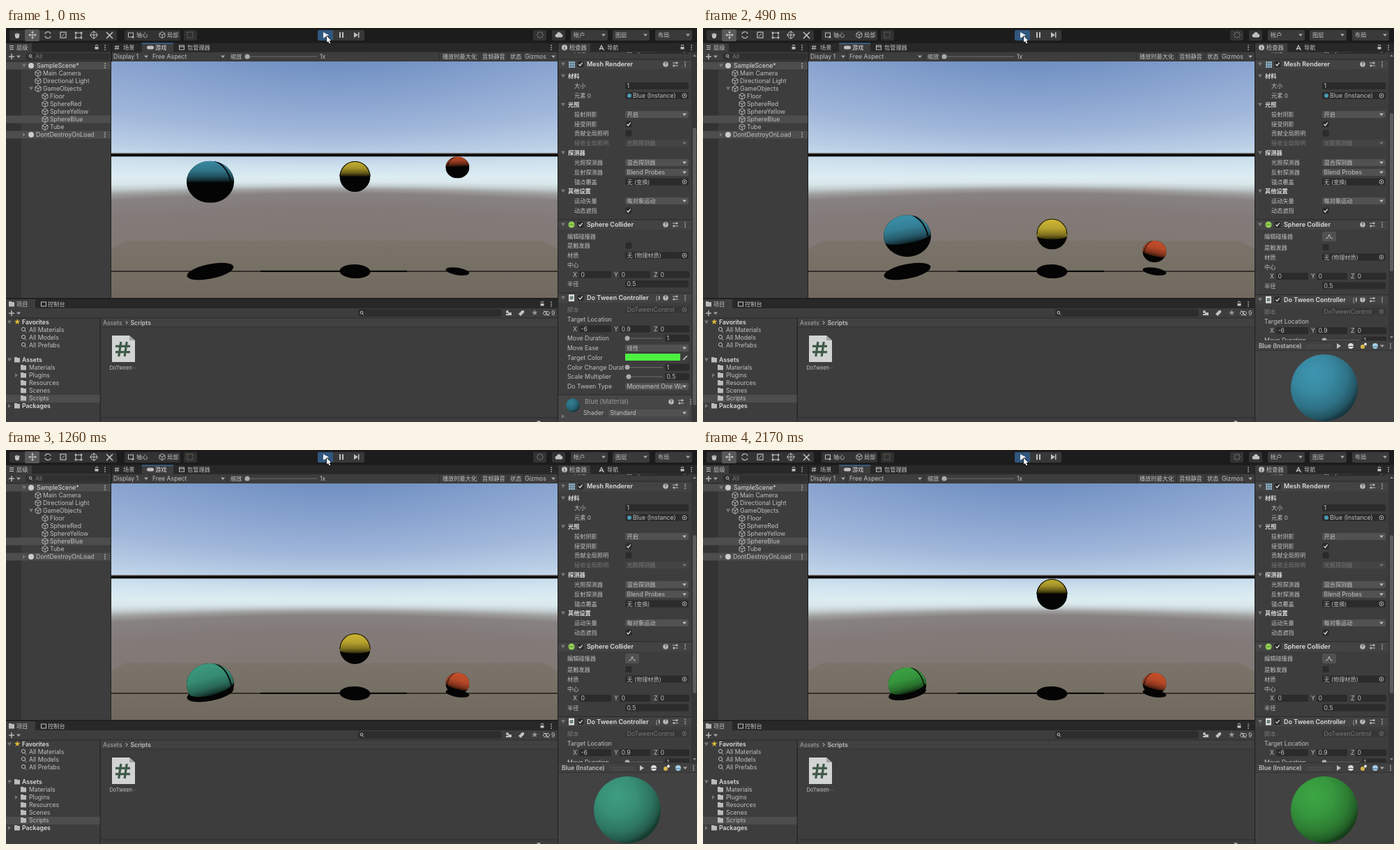
An HTML page with a canvas that plays this animation: 991 by 565 pixels, repeating every 2.24 s.

```html
<!DOCTYPE html>
<html lang="zh">
<head>
<meta charset="utf-8">
<style>
html, body { margin: 0; width: 991px; height: 565px; overflow: hidden; background: #3c3c3c; }
canvas { display: block; }
</style>
</head>
<body>
<canvas id="stage" width="991" height="565"></canvas>
<script>
const g = document.getElementById('stage').getContext('2d');
const LOOP = 2240, STEP = 70, PI = Math.PI;
const INK = '#c0c0c0', DIM = '#777', FIELD = '#2b2b2b', BOX = '#515151', PANEL = '#3d3d3d', DARK = '#282828';

// ---- drawing helpers ----
function rect(x, y, w, h, c) { g.fillStyle = c; g.fillRect(x, y, w, h); }
function text(s, x, y, c = INK, bold = false, size = /[\u4e00-\u9fff]/.test(s) ? 8.2 : 8.7) {
  g.font = `${bold ? 600 : 400} ${size}px Inter, "Noto Sans CJK SC", "Noto Sans CJK", sans-serif`;
  g.fillStyle = c;
  g.fillText(s, x, y + .6);
}
function poly(c, ...p) {
  g.fillStyle = c;
  g.beginPath();
  for (let i = 0; i < p.length; i += 2) g.lineTo(p[i], p[i + 1]);
  g.fill();
}
function line(c, w, ...p) {
  g.strokeStyle = c; g.lineWidth = w;
  g.beginPath();
  for (let i = 0; i < p.length; i += 2) g.lineTo(p[i], p[i + 1]);
  g.stroke();
}
function disc(x, y, r, c) { g.fillStyle = c; g.beginPath(); g.arc(x, y, r, 0, 7); g.fill(); }
function ring(x, y, r, c = INK, w = 1) {
  g.strokeStyle = c; g.lineWidth = w;
  g.beginPath(); g.arc(x, y, r, 0, 7); g.stroke();
}
function box(x, y, w, h, c, r = 2) { g.fillStyle = c; g.beginPath(); g.roundRect(x, y, w, h, r); g.fill(); }
const down = (x, y, c = '#aaa') => poly(c, x - 3, y - 1.5, x + 3, y - 1.5, x, y + 2);
const right = (x, y, c = '#777') => poly(c, x - 2, y - 3, x + 2, y, x - 2, y + 3);
const fold = (x, y) => poly('#777', x - 3, y - 2.5, x + 3, y - 2.5, x, y + 2.5);
const dots = (x, y) => { for (const d of [-3, 0, 3]) rect(x - .7, y + d - .7, 1.5, 1.5, INK); };
const plus = (x, y) => { line(INK, 1.4, x - 4, y, x + 4, y); line(INK, 1.4, x, y - 4, x, y + 4); };
function lock(x, y) {
  rect(x - 2.5, y, 5, 3.5, INK);
  g.strokeStyle = INK; g.lineWidth = 1;
  g.beginPath(); g.arc(x, y - 1, 1.8, PI, 0); g.stroke();
}
function lens(x, y, r = 2.5) { ring(x, y - 1, r); line(INK, 1, x + r * .7, y + r * .5, x + r * 1.6, y + r * 1.4); }
function cube(x, y) {
  const h = 2.3;
  line(INK, .9, x, y - 4.5, x + 4, y - h, x + 4, y + h, x, y + 4.5, x - 4, y + h, x - 4, y - h, x, y - 4.5);
  line(INK, .9, x - 4, y - h, x, y, x + 4, y - h);
  line(INK, .9, x, y, x, y + 4.5);
}
function folder(x, y) { rect(x - 4, y - 4, 4, 2, '#bbb'); rect(x - 4, y - 3, 8, 6.5, '#bbb'); }
function hash(x, y, s, c, w) {
  for (const d of [-s * .4, s * .4]) {
    line(c, w, x - s, y + d, x + s, y + d);
    line(c, w, x + d + s * .15, y - s, x + d - s * .15, y + s);
  }
}
function frameIcon(x, y) { g.strokeStyle = INK; g.lineWidth = 1; g.strokeRect(x - 3.5, y - 3, 7, 6); }
function check(x, y, on = true) {
  box(x - 4.5, y - 4.5, 9, 9, FIELD);
  if (on) line('#ddd', 1.3, x - 2.5, y, x - .7, y + 2, x + 2.7, y - 2.3);
}

// ---- editor chrome ----
function toolbar() {
  rect(0, 0, 991, 21, '#1c1c1c');
  box(5, 3, 154, 15, '#333');
  box(27, 2, 21, 17, '#585858');
  for (const d of [-3, -1, 1, 3]) line(INK, 1.4, 16 + d, 7 + Math.abs(d) * .4, 16 + d * .6, 12);
  disc(16, 12, 3, INK);
  line(INK, 1.1, 33, 10, 43, 10); line(INK, 1.1, 38, 5, 38, 15);
  for (const [dx, dy] of [[1, 0], [-1, 0], [0, 1], [0, -1]]) {
    const x = 38 + dx * 6, y = 10 + dy * 6;
    poly(INK, x, y, x - dx * 3 + dy * 2, y - dy * 3 + dx * 2, x - dx * 3 - dy * 2, y - dy * 3 - dx * 2);
  }
  g.strokeStyle = INK; g.lineWidth = 1.2;
  for (const a of [.4, 3.5]) { g.beginPath(); g.arc(60, 10, 4.5, a, a + 2.4); g.stroke(); }
  g.strokeRect(78, 6, 8, 8); line(INK, 1, 80, 12, 84, 8);
  g.strokeRect(100, 7, 8, 7);
  for (const [x, y] of [[100, 7], [108, 7], [100, 14], [108, 14]]) disc(x, y, 1.4, INK);
  ring(126, 10, 4.5); line(INK, 1, 120, 10, 132, 10); line(INK, 1, 126, 4, 126, 16);
  line(INK, 1.6, 144, 6, 153, 15); line(INK, 1.6, 153, 6, 144, 15);
  box(170, 3, 80, 15, '#333');
  frameIcon(179, 10); disc(182, 13, 1.5, INK); text('轴心', 187, 10);
  cube(224, 10); text('局部', 231, 10);
  box(255, 3, 19, 15, '#303030');
  g.setLineDash([1.5, 1.5]); g.lineWidth = 1; g.strokeStyle = '#8a7a70'; g.strokeRect(260, 6, 8, 8); g.setLineDash([]);

  box(447, 3, 67, 15, '#383838');
  box(447, 3, 22, 15, '#30577f');
  poly('#eee', 455, 6, 463, 10.2, 455, 14.5);
  rect(478, 6, 2, 8, INK); rect(482, 6, 2, 8, INK);
  poly(INK, 499, 6, 505, 10, 499, 14); rect(505, 6, 1.5, 8, INK);

  box(756, 3, 19, 15, '#333');
  for (let a = 0; a < 8; a++) disc(766 + 4 * Math.cos(a * PI / 4), 10 + 4 * Math.sin(a * PI / 4), .8, '#999');
  box(783, 3, 19, 15, '#333');
  disc(793, 9, 3, INK); disc(790, 11, 2.4, INK); disc(796, 11, 2.4, INK); rect(790, 10, 6, 3.4, INK);
  [['帐户', 810], ['图层', 870], ['布局', 931]].forEach(([s, x]) => {
    box(x, 3, 53, 15, '#3a3a3a'); text(s, x + 4, 10); down(x + 47, 10);
  });
}
function cursor() {
  const p = [460, 11.5, 460, 20.5, 462, 18.7, 463.7, 22.3, 465.3, 21.6, 463.7, 18.2, 466.3, 18];
  line('#111', 1.5, ...p, 460, 11.5);
  poly('#fff', ...p);
}

function hierarchy() {
  rect(0, 22, 150, 365, PANEL);
  rect(0, 48, 22, 339, '#333');
  rect(0, 22, 150, 12.5, DARK); rect(0, 22, 37, 12.5, PANEL);
  for (const d of [-2.5, 0, 2.5]) line(INK, 1, 5, 28 + d, 11, 28 + d);
  text('层级', 15, 28); lock(130, 27); dots(142, 28);
  plus(8, 41); down(18, 41);
  box(28, 36, 121, 10, '#303030', 4); lens(35, 41, 1.8); text('All', 42, 41, DIM);
  rect(0, 47, 150, 1, '#2a2a2a');
  rect(0, 48.5, 150, 11, '#4d4d4d');
  rect(0, 125.5, 150, 11, '#4d4d4d');
  rect(0, 147.5, 150, 11, '#4d4d4d');
  fold(26, 54); disc(36, 54, 4, '#ccc'); text('SampleScene*', 44, 54, '#ddd'); dots(142, 54);
  ['Main Camera', 'Directional Light', 'GameObjects'].forEach((s, i) => { cube(46, 65 + i * 11); text(s, 53, 65 + i * 11); });
  fold(36, 87);
  ['Floor', 'SphereRed', 'SphereYellow', 'SphereBlue', 'Tube'].forEach((s, i) => { cube(56, 98 + i * 11); text(s, 63, 98 + i * 11); });
  right(26, 153); disc(36, 153, 4, '#ccc'); text('DontDestroyOnLoad', 43, 153); dots(142, 153);
}

function gameBar() {
  rect(152, 22, 639, 12.5, DARK);
  rect(195, 22, 45, 12.5, PANEL); rect(195, 21.5, 45, 1.2, '#3f78b5');
  hash(159, 28, 3.4, INK, .9); text('场景', 168, 28);
  box(202, 25.5, 10, 5, INK, 2.5); text('游戏', 214, 28, '#ddd');
  frameIcon(252, 28); line(INK, 1, 249, 27, 256, 27); text('包管理器', 260, 28);
  dots(782, 28);
  rect(152, 34.5, 639, 13.5, PANEL);
  [['Display 1', 154], ['Free Aspect', 210], ['缩放', 322], ['1x', 450], ['播放时最大化', 626],
   ['音频静音', 683], ['状态', 723], ['Gizmos', 744]].forEach(([s, x]) => text(s, x, 41));
  for (const x of [201, 311, 785]) down(x, 41);
  for (const x of [206, 317, 621, 679, 719, 741]) rect(x, 35, 1, 12, '#303030');
  rect(346, 40.5, 100, 1.2, '#666'); disc(346, 41, 3.6, '#aaa');
}

function project() {
  rect(0, 389, 791, 176, PANEL);
  rect(0, 389, 791, 13, DARK); rect(0, 389, 42, 13, PANEL);
  folder(8, 396); text('项目', 15, 396);
  frameIcon(54, 396); text('控制台', 60, 396);
  lock(769, 395); dots(782, 396);
  plus(8, 409); down(18, 409);
  box(505, 403, 206, 11, '#2d2d2d', 4); lens(510, 409, 1.8);
  disc(719, 407, 2, INK); rect(720, 408, 5, 4, INK); rect(717, 410, 3, 2, INK);
  poly(INK, 735, 410, 740, 405, 743, 405, 743, 408, 738, 413);
  text('★', 753, 408.5, '#999', false, 10);
  g.strokeStyle = INK; g.lineWidth = 1;
  g.beginPath(); g.ellipse(775, 409, 4.5, 2.6, 0, 0, 7); g.stroke();
  disc(775, 409, 1.2, INK); line(INK, 1, 771, 405, 779, 413); text('9', 782, 409);
  rect(0, 415.5, 791, 1, '#2b2b2b');
  rect(134.5, 416, 1.5, 149, '#282828');
  rect(0, 526, 134.5, 11, '#4d4d4d');
  rect(136, 416.5, 655, 12, '#414141'); rect(136, 428.5, 655, 1, '#333');
  text('Assets', 139, 422.5, '#aaa'); text('›', 171, 422, INK, false, 11); text('Scripts', 178.5, 422.5, INK, true, 8.6);
  fold(5, 422); text('★', 11, 421.5, '#e0b93a', false, 10); text('Favorites', 23, 422, '#ddd', true);
  ['All Materials', 'All Models', 'All Prefabs'].forEach((s, i) => { lens(25, 433 + i * 11, 2.6); text(s, 33, 433 + i * 11); });
  fold(5, 476); folder(16, 476); text('Assets', 23, 476, '#ddd', true);
  ['Materials', 'Plugins', 'Resources', 'Scenes', 'Scripts'].forEach((s, i) => { folder(25, 487 + i * 11); text(s, 33, 487 + i * 11); });
  right(15, 498);
  right(5, 542); folder(16, 542); text('Packages', 23, 542, '#ddd', true);
  poly('#d2d4d3', 152, 441, 177, 441, 185, 448, 185, 479, 152, 479);
  poly('#9fa3a1', 177, 441, 185, 448, 177, 448);
  hash(167.5, 460.5, 10.5, '#3e5a48', 3.2);
  text('DoTween···', 148.5, 487, INK, false, 7.4);
  rect(136, 558.5, 655, 1, '#2d2d2d');
  disc(764, 566, 3, '#aaa');
}

// ---- inspector ----
const label = (s, y, x = 815, c = INK) => text(s, x, y, c);
function drop(s, y, c = INK, x = 888) {
  box(x, y - 5, 979 - x, 10, c === DIM ? '#444' : BOX);
  g.save(); g.beginPath(); g.rect(x, y - 6, 970 - x, 12); g.clip();
  text(s, x + 2.5, y, c); g.restore();
  down(973, y, c);
}
function input(s, x, y, w) { box(x, y - 5, w, 10, FIELD); text(s, x + 2.5, y); }
function object(s, y, c = INK) {
  box(888, y - 5, 91, 10, c === DIM ? '#363636' : FIELD);
  text(s, 890.5, y, c); ring(973, y, 3, c, .9); disc(973, y, 1.1, c);
}
function slider(y, knob, value) {
  rect(888, y - .5, 54, 1.2, '#666'); disc(knob, y, 3.4, '#aaa'); input(value, 945, y, 35);
}
function vector(y, values) {
  [[813, 822, 46], [872, 880, 44], [929, 936, 44]].forEach(([x, fx, w], i) => {
    text('XYZ'[i], x, y); input(values[i], fx, y, w);
  });
}
function helpIcons(y) {
  disc(946, y, 3.7, INK); text('?', 944, y - .2, PANEL, true, 7);
  for (const d of [-2, 2]) { line(INK, 1, 956, y + d, 964, y + d); rect(959 - d, y + d - 1.5, 1.6, 3, INK); }
  dots(974, y);
}
function header(s, y) {
  rect(792, y - 7, 191, 14, '#434343'); rect(792, y - 7.5, 191, 1, '#2a2a2a');
  fold(799, y); check(824, y); text(s, 833, y, '#ddd', true, 9); helpIcons(y);
}
const section = (s, y) => { fold(799, y); text(s, 806, y, '#ddd', true); };

function components(open) {
  label('网格', 32); object('', 32); text('Sphere', 901, 32); frameIcon(894, 32);
  header('Mesh Renderer', 52);
  for (const dx of [0, 3.2, 6.4]) for (const dy of [0, 3.2, 6.4]) rect(807 + dx, 48 + dy, 2.6, 2.6, '#8fb8d0');
  section('材料', 69);
  label('大小', 83); input('1', 888, 83, 91);
  label('元素 0', 97); object('', 97); disc(894, 97, 3, '#4a9bb5'); text('Blue (Instance)', 899, 97);
  section('光照', 110);
  label('投射阴影', 124); drop('开启', 124);
  label('接受阴影', 138); check(893, 138);
  label('贡献全局照明', 151); check(893, 151, false);
  label('接收全局照明', 165, 815, DIM); drop('光照探测器', 165, DIM);
  section('探测器', 179);
  label('光照探测器', 193); drop('混合探测器', 193);
  label('反射探测器', 207); drop('Blend Probes', 207);
  label('锚点覆盖', 220.5); object('无 (变换)', 220.5);
  section('其他设置', 234);
  label('运动矢量', 248); drop('每对象运动', 248);
  label('动态遮挡', 262); check(893, 262);
  header('Sphere Collider', 282);
  disc(811, 282, 4.6, '#94cf55'); line('#4f7f2c', .8, 807, 282, 815, 282);
  label('编辑碰撞器', 298.5, 805);
  if (open) {
    box(888, 292, 20, 14, BOX);
    line(INK, 1, 893, 302, 896, 301, 898, 296, 900, 301, 903, 302);
    g.translate(0, 2.6);
  }
  label('是触发器', 312, 805); check(893, 312, false);
  label('材质', 326, 805); object('无 (物理材质)', 326);
  label('中心', 340, 805); vector(353.5, ['0', '0', '0']);
  label('半径', 367, 805); input('0.5', 888, 367, 91);
  header('Do Tween Controller', 387);
  rect(930, 382, 9, 10, '#434343'); text('⟮', 932, 387); rect(936, 384, 1.5, 6, INK);
  rect(807, 382, 8, 10, '#ddd'); hash(811, 387, 2.6, '#3e5a48', .9);
  label('脚本', 404, 805, DIM); object('DoTweenControl', 404, DIM);
  label('Target Location', 418, 805); vector(431.5, ['-6', '0.9', '0']);
  label('Move Duration', 445, 805); slider(445, 891, '1');
  label('Move Ease', 459, 805); drop('线性', 459);
  label('Target Color', 472.5, 805); rect(888, 467, 79, 10, '#4df041');
  line(INK, 1.6, 971, 476, 977, 470);
  label('Color Change Durat', 486.5, 805); rect(887, 480, 4, 12, PANEL); slider(486.5, 891, '1');
  label('Scale Multiplier', 500, 805); slider(500, 893, '0.5');
  label('Do Tween Type', 514, 805); drop('Momement One Way', 514);
}

function material() {
  rect(792, 526, 191, 39, '#464646'); rect(792, 525.5, 191, 1, '#2a2a2a');
  previewBall(813, 541, 10, [50, 128, 150]);
  text('Blue (Material)', 830, 536, '#999', false, 9.2);
  g.save(); g.translate(8, 0); helpIcons(536); g.restore();
  text('Shader', 828, 552); drop('Standard', 552, INK, 864); right(799, 557);
}

function inspector(open, col) {
  rect(792, 22, 199, 543, PANEL);
  g.save();
  g.beginPath(); g.rect(792, 34.5, 191, (open ? 448 : 565) - 34.5); g.clip();
  components(open);
  if (!open) material();
  g.restore();
  rect(792, 22, 199, 12.5, DARK); rect(792, 22, 46, 12.5, PANEL);
  disc(801, 28, 4, INK); text('i', 800, 28, DARK, true, 7); text('检查器', 808, 28);
  line(INK, 1.2, 851, 31, 854, 25, 857, 31, 854, 29, 851, 31); text('导航', 862, 28);
  lock(970, 27); dots(983, 28);
  rect(983, 34.5, 8, open ? 414 : 531, '#363636');
  if (open) box(985, 122, 5, 227, '#5c5c5c', 2.5); else box(985, 143, 5, 398, '#5c5c5c', 2.5);
  poly('#888', 985, 41, 990, 41, 987.5, 38);
  if (!open) return;
  poly('#888', 985, 442, 990, 442, 987.5, 445);
  rect(792, 448, 199, 15, '#333'); rect(792, 449, 199, 13, '#404040');
  text('Blue (Instance)', 797, 456, INK, true, 8.5);
  line('#555', 1, 866, 455, 901, 455); line('#555', 1, 866, 458, 901, 458);
  poly(INK, 909, 452, 915, 456, 909, 460);
  disc(929, 456, 4, '#ddd'); rect(925, 456, 8, 1, '#555');
  disc(946, 457, 3, '#d9b64d'); disc(950, 453.5, 2, '#eee');
  disc(964, 456, 4, '#a8cfe8'); rect(960, 456.5, 8, 1.2, '#4c7fa0');
  down(974, 456); dots(986, 456);
  rect(792, 463, 199, 102, '#424242');
  previewBall(891, 516, 48, col);
}

// ---- 3D view ----
const rgb = (c, k = 1) => `rgb(${c.map(v => Math.round(v * k))})`;
const mix = (a, b, k) => a.map((v, i) => v + (b[i] - v) * k);
function track(t, ...keys) {
  for (let i = 2; i < keys.length; i += 2) {
    if (t < keys[i]) return keys[i - 1] + (keys[i + 1] - keys[i - 1]) * (t - keys[i - 2]) / (keys[i] - keys[i - 2]);
  }
  return keys.at(-1);
}
function stops(grad, ...s) {
  for (let i = 0; i < s.length; i += 2) grad.addColorStop(s[i], s[i + 1]);
  return grad;
}
function previewBall(x, y, r, c) {
  disc(x, y, r, stops(g.createRadialGradient(x - r * .3, y - r * .45, 0, x - r * .3, y - r * .35, r * 1.46),
    0, rgb(c, .97), .4, rgb(c, .88), .7, rgb(c, .72), .87, rgb(c, .55), .95, rgb(c, .38), 1, rgb(c, .33)));
}

// Lines of equal elevation bend away from the eye level towards the sides.
function backdrop() {
  const eye = 215, focal = 294, at = y => (y - 40) / 347;
  g.fillStyle = stops(g.createLinearGradient(0, 40 - eye, 0, 387 - eye),
    at(48), '#7090c2', at(100), '#87a2ce', at(150), '#a0b7da', at(182), '#bacee5', at(200), '#cfe2ee',
    at(214), '#dcedf2', at(221), '#d9e7ea', at(226), '#c3cdd0', at(231), '#a09f9f', at(237), '#878281',
    at(255), '#837b79', at(300), '#817873', at(387), '#786f68');
  for (let x = 151; x < 791; x += 2) {
    g.save();
    g.translate(0, eye);
    g.scale(1, Math.hypot(1, (x - 470) / focal));
    g.fillRect(x, -180, 2, 360);
    g.restore();
  }
}
function scenery() {
  backdrop();
  poly(stops(g.createLinearGradient(0, 305, 0, 387), 0, '#7b746b', .5, '#766f64', 1, '#71695f'),
    172, 305, 770, 305, 791, 317, 791, 387, 151, 387, 151, 317);
  rect(151, 179.7, 640, 4.6, '#060505'); rect(151, 179.7, 640, 1.2, '#4a382c');
  rect(151, 348.2, 640, 1.4, '#1b1714'); rect(365, 347.8, 210, 2, '#050505');
}

function ball(x, y, rx, ry, col, lean, shRy, shTilt) {
  const dx = rx * Math.cos(shTilt), dy = rx * Math.sin(shTilt), floor = 349;
  g.fillStyle = '#040404';
  g.beginPath(); g.ellipse(x, floor, rx, shRy, shTilt, 0, 7); g.fill();
  g.save();
  // the floor hides whatever sinks below it
  g.beginPath();
  g.ellipse(x, floor, rx, shRy, shTilt, 0, PI);
  for (const p of [[x - 60, floor - dy], [x - 60, 0], [x + 60, 0], [x + 60, floor + dy], [x + dx, floor + dy]]) g.lineTo(...p);
  g.clip();
  g.beginPath(); g.ellipse(x, y, rx, ry, 0, 0, 7); g.clip();
  rect(x - rx, y - ry, rx * 2, ry * 2, '#040404');
  g.translate(x, y);
  const depth = (y - 215) / 230, edge = ry * depth, turn = lean * depth * 2;
  g.rotate(turn);
  g.fillStyle = stops(g.createLinearGradient(0, -ry, 0, edge),
    0, rgb(col, .88 + depth * .12), .45, rgb(col, .74 + depth * .22), .75, rgb(col, .48 + depth * .32),
    .92, rgb(col, .24 + depth * .3), 1, rgb(col, .06 + depth * .2));
  g.beginPath();
  g.ellipse(0, 0, rx + 3, Math.abs(edge), 0, 0, PI, edge < 0);
  g.lineTo(-rx - 3, -ry * 2); g.lineTo(rx + 3, -ry * 2);
  g.fill();
  g.rotate(-turn);
  g.strokeStyle = '#080808';
  if (lean) {
    const s = -Math.sign(lean);
    g.lineWidth = rx * .055;
    g.beginPath(); g.moveTo(s * rx * .2, -ry);
    g.quadraticCurveTo(s * rx * .8, -ry * .72, s * rx * .91, ry * .25);
    g.stroke();
  } else {
    g.lineWidth = 2;
    g.beginPath(); g.ellipse(0, 0, rx, ry, 0, PI, 0); g.stroke();
  }
  g.restore();
}

function view(t, col) {
  g.save();
  g.beginPath(); g.rect(151, 48, 640, 339); g.clip();
  scenery();
  const u = track(t, 0, .047, 70, .35, 280, .526, 490, .687, 770, .958, 820, 1);
  const back = track(t, 820, 1, 1260, .605, 1610, .27, 1890, 0);
  const size = 1 - .5 * track(t, 0, 0, 1780, 0, 2780, 1);
  ball(293, 215 + 121 * u, 34 * size, 30 * size, col, -.26, 10.5 * size, -.2);
  ball(500.5, 207 + 129 * (t < 820 ? u : back), 22, 22, [224, 200, 56], 0, 10, .03);
  ball(647.5, 186.3 + 148.7 * (1 - (1 - u) ** 2), 17, 15.5, [212, 84, 46], .26, 5.2, .16);
  g.restore();
}

function draw(t) {
  const k = track(t, 0, 0, 820, 0, 1820, 1);
  const col = mix([64, 155, 182], [62, 172, 70], k);
  g.textBaseline = 'middle';
  rect(0, 0, 991, 565, '#202020');
  toolbar();
  hierarchy();
  gameBar();
  view(t, col);
  project();
  inspector(t >= STEP, col);
  cursor();
}

const start = performance.now();
let shown = -1;
function tick() {
  const t = Math.floor((performance.now() - start) % LOOP / STEP) * STEP;
  if (t !== shown) draw(shown = t);
  requestAnimationFrame(tick);
}
tick();
</script>
</body>
</html>
```
